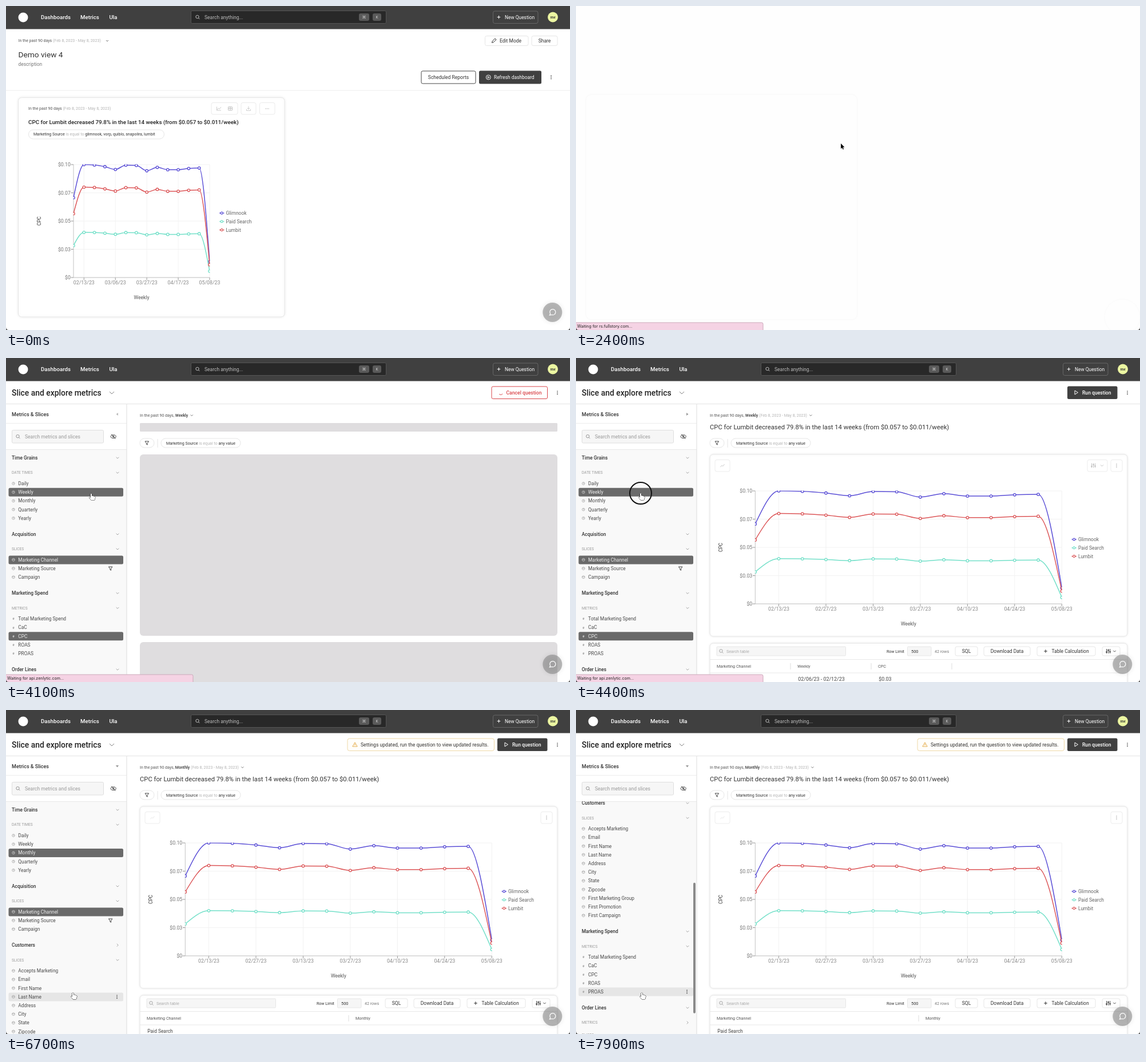
Recreate the animation shown at these times as an HTML page with a canvas. Size 986x568 px, loop 8000 ms.

```html
<!DOCTYPE html>
<html lang="en">
<head>
<meta charset="utf-8">
<title>Dashboard to explore view</title>
<style>
html, body { margin: 0; width: 100%; height: 100%; overflow: hidden; background: #fff; }
canvas { display: block; width: 986px; height: 568px; }
</style>
</head>
<body>
<canvas id="stage"></canvas>
<script>
const W = 986, H = 568, LOOP = 8000;
const canvas = document.getElementById('stage');
const g = canvas.getContext('2d');
const dpr = window.devicePixelRatio || 1;
canvas.width = W * dpr;
canvas.height = H * dpr;

const INK = '#333', TEXT = '#555', MUTED = '#b4b4b4', EDGE = '#e6e6e6', DARK = '#404040', RED = '#d9454a';
const HEADLINE = 'CPC for Lumbit decreased 79.8% in the last 14 weeks (from $0.057 to $0.011/week)';
const DATES = ' (Feb 8, 2023 - May 8, 2023)';

// Times at which the state changes, in ms
const BLANK = 1400, EXPLORE = 2600, LOADED = 4400, MONTHLY_ON = 4900, WEEKLY_OFF = 5700, CPC_OFF = 6300;

// ---------- helpers ----------
const clamp = v => Math.max(0, Math.min(1, v));
const ease = v => { v = clamp(v); return v * v * (3 - 2 * v); };

function track(keys, t) {
  let i = keys.findIndex(k => k[0] > t);
  if (i < 0) return keys[keys.length - 1].slice(1);
  if (i === 0) return keys[0].slice(1);
  const a = keys[i - 1], b = keys[i], k = ease((t - a[0]) / (b[0] - a[0]));
  return a.slice(1).map((v, n) => v + (b[n + 1] - v) * k);
}

function text(s, x, y, size, color = INK, weight = 400, align = 'left', font = 'Roboto') {
  g.font = `${weight} ${size}px ${font}, sans-serif`;
  g.textAlign = align;
  g.fillStyle = color;
  g.fillText(s, x, y + size * 0.355);
  return g.measureText(s).width;
}

function runs(x, y, size, ...parts) {
  for (const [s, color, weight] of parts) x += text(s, x, y, size, color, weight);
  return x;
}

function box(x0, y0, x1, y1, r, fill, stroke, lw = 1) {
  g.beginPath();
  g.roundRect(x0, y0, x1 - x0, y1 - y0, r);
  if (fill) { g.fillStyle = fill; g.fill(); }
  if (stroke) { g.strokeStyle = stroke; g.lineWidth = lw; g.stroke(); }
}

function line(color, lw, ...p) {
  g.beginPath();
  for (let i = 0; i < p.length; i += 2) g.lineTo(p[i], p[i + 1]);
  g.strokeStyle = color;
  g.lineWidth = lw;
  g.stroke();
}

function disc(x, y, r, fill, stroke, lw = 1) {
  g.beginPath();
  g.arc(x, y, r, 0, 7);
  if (fill) { g.fillStyle = fill; g.fill(); }
  if (stroke) { g.strokeStyle = stroke; g.lineWidth = lw; g.stroke(); }
}

function shadowed(blur, color, draw) {
  g.save();
  g.shadowColor = color;
  g.shadowBlur = blur * dpr;
  draw();
  g.restore();
}

function chevron(x, y, s = 2.5, color = '#888', right = false) {
  if (right) line(color, 0.9, x - s / 2, y - s, x + s / 2, y, x - s / 2, y + s);
  else line(color, 0.9, x - s, y - s / 2, x, y + s / 2, x + s, y - s / 2);
}

function kebab(x, y, color = INK, flat = false) {
  for (const d of [-2.6, 0, 2.6]) disc(flat ? x + d : x, flat ? y : y + d, 0.8, color);
}

function lens(x, y, color) {
  disc(x, y, 2.7, null, color, 0.9);
  line(color, 0.9, x + 2, y + 2, x + 4, y + 4);
}

function plus(x, y, color) {
  line(color, 1, x - 2.8, y, x + 2.8, y);
  line(color, 1, x, y - 2.8, x, y + 2.8);
}

function funnel(x, y) {
  line(INK, 0.9, x - 3.3, y - 3, x + 3.3, y - 3, x + 0.9, y + 0.3, x + 0.9, y + 3.2, x - 0.9, y + 2.2, x - 0.9, y + 0.3, x - 3.3, y - 3);
}

function sliders(x, y, color) {
  for (const [d, k] of [[-3, 1.5], [0, -1.5], [3, 1]]) {
    line(color, 0.9, x + d, y - 4, x + d, y + 4);
    disc(x + d, y + k, 1.2, color);
  }
}

function trend(x, y, color) {
  line(color, 0.9, x - 3.5, y + 2.5, x - 1, y - 0.5, x + 0.7, y + 1.2, x + 3.5, y - 2.5);
}

function button(label, x0, y0, x1, y1, size = 8.5) {
  box(x0, y0, x1, y1, 3, '#fff', EDGE);
  text(label, (x0 + x1) / 2, (y0 + y1) / 2, size, INK, 400, 'center');
}

// ---------- line chart ----------
const DROPS = [58, 0, 0.7, 3.7, 8.5, 1, 1.5, 10.8, 4.8, 9, 9, 6.8, 6, 170];
const SERIES = [['Glimnook', '#5a4ed6', 1], ['Paid Search', '#74e0c9', 0.4], ['Lumbit', '#dc5759', 0.8]];
const WEEKS = ['02/06', '02/13', '02/20', '02/27', '03/06', '03/13', '03/20', '03/27', '04/03', '04/10', '04/17', '04/24', '05/01', '05/08'];

function smoothLine(xs, ys) {
  const h = xs[1] - xs[0], n = xs.length;
  const s = ys.slice(1).map((y, i) => (y - ys[i]) / h);
  const m = ys.map((_, i) => {
    if (!i || i === n - 1) return 0;
    const a = s[i - 1], b = s[i];
    return (Math.sign(a) + Math.sign(b)) * Math.min(Math.abs(a), Math.abs(b), Math.abs(a + b) / 4);
  });
  m[0] = (3 * s[0] - m[1]) / 2;
  m[n - 1] = (3 * s[n - 2] - m[n - 2]) / 2;
  g.beginPath();
  g.moveTo(xs[0], ys[0]);
  for (let i = 1; i < n; i++) {
    g.bezierCurveTo(xs[i - 1] + h / 3, ys[i - 1] + m[i - 1] * h / 3, xs[i] - h / 3, ys[i] - m[i] * h / 3, xs[i], ys[i]);
  }
  g.stroke();
}

function chart(x0, x1, y0, every, titleX, legendX) {
  const h = 198, y1 = y0 + h, step = (x1 - x0) / 13;
  const xs = DROPS.map((_, i) => x0 + i * step);
  ['$0.10', '$0.07', '$0.05', '$0.03', '$0'].forEach((s, i) => {
    const y = y0 + i * h / 4;
    line('#efefef', 0.8, x0, y, x1, y);
    line('#888', 0.9, x0 - 4.5, y, x0, y);
    text(s, x0 - 5, y, 8.8, '#777', 400, 'right');
  });
  for (let i = 1; i < 14; i += every) {
    line('#efefef', 0.8, xs[i], y0, xs[i], y1);
    line('#888', 0.9, xs[i], y1, xs[i], y1 + 4.5);
    text(WEEKS[i] + '/23', xs[i], y1 + 9, 8.8, '#888', 400, 'center');
  }
  line('#bbb', 0.9, x0, y0, x0, y1, x1, y1);

  g.save();
  g.beginPath();
  g.rect(x0 - 0.5, y0 - 0.5, x1 - x0 + 1, h + 1);
  g.clip();
  for (const [, color, k] of SERIES) {
    const ys = DROPS.map(d => y1 - (h - d) * k);
    g.strokeStyle = color;
    g.lineWidth = 1.5;
    smoothLine(xs, ys);
    xs.forEach((x, i) => disc(x, ys[i], 2.2, '#fff', color, 1.3));
  }
  g.restore();

  const mid = y0 + h / 2;
  SERIES.forEach(([name, color], i) => {
    const y = mid - 14 + i * 14.8;
    line(color, 1.2, legendX, y, legendX + 8.5, y);
    disc(legendX + 4.2, y, 1.9, '#fff', color, 1.2);
    text(name, legendX + 11.5, y, 8.5, '#666');
  });
  text('Weekly', (x0 + x1) / 2, y1 + 35, 8.5, TEXT, 400, 'center');
  g.save();
  g.translate(titleX, mid);
  g.rotate(-Math.PI / 2);
  text('CPC', 0, 0, 8.3, INK, 400, 'center');
  g.restore();
}

// ---------- shared parts ----------
function topBar() {
  g.fillStyle = DARK;
  g.fillRect(0, 0, W, 40.5);
  disc(30, 20, 8.5, '#fff');
  text('Dashboards', 61, 20, 9.7, '#fff', 500);
  text('Metrics', 130, 20, 9.7, '#fff', 500);
  text('Ula', 180.5, 20, 9.7, '#fff', 500);
  box(323.5, 8.5, 664.5, 30.5, 2, '#282828', '#555');
  lens(334.5, 19, '#ccc');
  text('Search anything...', 347, 20, 8.5, '#bbb');
  box(617, 13, 635, 26, 3, '#5a5a5a');
  box(641, 13, 656, 26, 3, '#5a5a5a');
  text('⌘', 626, 19.5, 7, '#ccc', 400, 'center', 'DejaVu Sans');
  text('K', 648.5, 19.5, 6.5, '#ccc', 400, 'center');
  box(851.5, 9, 930, 30.5, 3, null, '#666');
  plus(861.5, 19.5, '#fff');
  text('New Question', 872, 20, 8.4, '#fff');
  disc(956, 19.5, 9, '#ecf6a2');
  text('RM', 956, 19.5, 6, INK, 500, 'center');
}

function chatBubble() {
  shadowed(8, 'rgba(0,0,0,.18)', () => disc(955.3, 537, 17, 'rgba(125,125,125,.52)'));
  g.beginPath();
  g.arc(955.8, 536.6, 5, 2.5, 8.2);
  g.lineTo(950.4, 542);
  g.closePath();
  g.strokeStyle = '#fff';
  g.lineWidth = 1.2;
  g.stroke();
}

function corners() {
  g.fillStyle = '#444';
  for (const [x, d] of [[0, 1], [W, -1]]) {
    g.beginPath();
    g.moveTo(x, H - 5);
    g.quadraticCurveTo(x, H, x + 5 * d, H);
    g.lineTo(x, H);
    g.fill();
  }
}

// ---------- dashboard ----------
function dashboard() {
  topBar();
  runs(21.5, 61, 7, ['In the past 90 days', TEXT], [DATES, MUTED]);
  chevron(177, 61, 2, '#666');
  text('Demo view 4', 21.5, 85.5, 13.7, INK);
  text('description', 21.5, 102, 8.4, '#777');
  box(837.5, 52.5, 913, 69.5, 3, '#fff', EDGE);
  line(INK, 1, 849.5, 64.3, 850.3, 61.6, 855, 57, 857, 59, 852.2, 63.6, 849.5, 64.3);
  text('Edit Mode', 863, 61, 8.5);
  button('Share', 919, 52.5, 964, 69.5);
  box(726, 114, 821, 136, 2.5, '#fff', '#444');
  text('Scheduled Reports', 773.5, 125, 8.5, INK, 400, 'center');
  box(827, 113.5, 936, 136.5, 2.5, DARK);
  disc(843.3, 125, 4, null, '#fff', 0.9);
  line('#fff', 0.9, 842.2, 123.2, 845.2, 125, 842.2, 126.8, 842.2, 123.2);
  text('Refresh dashboard', 853, 125, 8.4, '#fff');
  kebab(953, 125);
  line('#ececec', 1, 0, 148, W, 148);

  shadowed(5, 'rgba(0,0,0,.08)', () => box(21.5, 160.5, 487, 545, 6, '#fff', EDGE));
  runs(39, 180, 7, ['In the past 90 days', TEXT], [DATES, MUTED]);
  for (const [a, b] of [[359, 405], [411, 437], [443.5, 470]]) box(a, 169.5, b, 190, 3, '#fff', '#ebebeb');
  line('#c8c8c8', 0.9, 368.5, 176.5, 368.5, 183, 376, 183);
  trend(372.5, 179.5, '#c8c8c8');
  box(388.5, 176.8, 395.5, 182.8, 0.5, null, '#c0c0c0', 1);
  line('#c0c0c0', 1, 388.5, 179.5, 395.5, 179.5);
  line('#c0c0c0', 1, 392, 177, 392, 183);
  line('#c8c8c8', 0.9, 424, 176, 424, 181, 422, 179, 424, 181, 426, 179);
  line('#c8c8c8', 0.9, 420.5, 181, 420.5, 183.3, 427.5, 183.3, 427.5, 181);
  kebab(456.5, 180, '#bbb', true);
  text(HEADLINE, 39, 203.5, 9.8, '#222', 500);
  box(39.5, 217, 276.5, 233, 8, '#fff', EDGE);
  runs(48, 225, 7, ['Marketing Source', INK], [' is equal to', MUTED], [' glimnook, vorp, quiblo, snapolira, lumbit', INK]);
  chart(118, 356, 278, 3, 58, 373);
  chatBubble();
}

function blankPage() {
  g.fillStyle = '#fefefe';
  g.fillRect(0, 0, W, H);
  box(17, 155, 492, 550, 10, null, '#fbfbfb', 2);
  disc(955, 545, 31, null, '#fcfcfc', 2);
}

// ---------- explore view ----------
const GRAINS = ['Daily', 'Weekly', 'Monthly', 'Quarterly', 'Yearly'];
const SPEND = ['Total Marketing Spend', 'CaC', 'CPC', 'ROAS', 'PROAS'];
const CUSTOMER = ['Accepts Marketing', 'Email', 'First Name', 'Last Name', 'Address', 'City', 'State', 'Zipcode',
  'First Marketing Group', 'First Promotion', 'First Campaign'];

function sections(t) {
  const list = [
    ['Time Grains', 'DATE TIMES', GRAINS],
    ['Acquisition', 'SLICES', ['Marketing Channel', 'Marketing Source', 'Campaign']]
  ];
  if (t >= CPC_OFF) list.push(['Customers', 'SLICES', CUSTOMER]);
  const narrow = t >= MONTHLY_ON && t < CPC_OFF;
  list.push(['Marketing Spend', 'METRICS', narrow ? [SPEND[0], SPEND[2]] : SPEND]);
  if (!narrow) list.push(['Order Lines', 'METRICS', []]);
  return list;
}

function itemIcon(kind, x, y, color) {
  if (kind === 'METRICS') return text('#', x, y, 6, color, 700, 'center');
  if (kind === 'SLICES') {
    line(color, 0.7, x, y - 2.6, x + 2.2, y - 1.3, x + 2.2, y + 1.3, x, y + 2.6, x - 2.2, y + 1.3, x - 2.2, y - 1.3, x, y - 2.6);
    return line(color, 0.7, x - 2.2, y - 1.3, x, y, x + 2.2, y - 1.3);
  }
  disc(x, y, 2.3, null, color, 0.7);
  line(color, 0.7, x, y - 1.4, x, y, x + 1.2, y);
}

function sidebar(t, mouse) {
  const [scroll] = track([[7150, 0], [7500, 190], [7650, 190], [7900, 249]], t);
  const narrow = t >= MONTHLY_ON && t < CPC_OFF;
  const picked = { 'Marketing Channel': 1, Weekly: t < WEEKLY_OFF, Monthly: t >= MONTHLY_ON, CPC: t < CPC_OFF };
  g.fillStyle = '#fff';
  g.fillRect(0, 81, 211, H);
  text('Metrics & Slices', 10, 98.5, 9, INK, 500);
  g.save();
  g.translate(194.5, 98.5);
  g.rotate(t < LOADED ? Math.PI : ease((t - LOADED) / 300) * Math.PI / 2);
  g.beginPath();
  g.moveTo(-1.5, -2.6);
  g.lineTo(2, 0);
  g.lineTo(-1.5, 2.6);
  g.fillStyle = t < LOADED ? '#bbb' : '#999';
  g.fill();
  g.restore();
  line('#ececec', 1, 0, 114.5, 211, 114.5);
  box(10.5, 126.5, 170.5, 149, 2, '#f6f6f6', '#dedede');
  lens(20.5, 137.2, '#888');
  text('Search metrics and slices', 33, 138, 8.5, '#999');
  g.beginPath();
  g.ellipse(187.7, 137.7, 4.5, 2.9, 0, 0, 7);
  g.strokeStyle = INK;
  g.lineWidth = 0.9;
  g.stroke();
  disc(187.7, 137.7, 1.3, null, INK, 0.9);
  line(INK, 0.9, 184, 133.8, 191.6, 141.6);

  g.save();
  g.beginPath();
  g.rect(0, 160, 212, 408);
  g.clip();
  g.fillStyle = '#f9f9f9';
  g.fillRect(0, 160, 211, narrow ? 337 : 408);
  line('#e8e8e8', 1, 0, 160.5, 211, 160.5);
  if (narrow) line('#e0e0e0', 1, 0, 497, 211, 497);
  let y = 175 - scroll;
  for (const [title, kind, items] of sections(t)) {
    text(title, 10, y, 8.4, INK, 500);
    chevron(195, y, 2.4, '#999', title === 'Customers' && t < 7000);
    y += 26;
    text(kind, 10, y, 6.6, '#999');
    chevron(195, y, 2.4, '#999', !items.length);
    y += 19;
    for (const name of items) {
      const on = picked[name];
      const hover = t > 4500 && mouse.hand && Math.abs(mouse.y + 3 - y) < 7.6;
      if (on || hover) box(4.5, y - 7.4, 205, y + 7.6, 2.5, on ? '#6a6a6a' : '#e6e6e6');
      itemIcon(kind, 13, y, on ? '#ddd' : '#999');
      text(name, 21.3, y, 8.4, on ? '#eee' : '#4a4a4a');
      if (name === 'Marketing Source') funnel(182.7, y);
      if (hover) kebab(194, y, on ? '#fff' : INK);
      y += 15.2;
    }
    y += 12.8;
    if (!items.length) text('SLICES', 10, y - 10, 6.6, '#999');
  }
  if (scroll > 0) {
    const top = 162 + scroll * 0.565;
    box(205, top, 209, top + 229, 2, '#8a8a8a');
  }
  g.restore();
  line('#dcdcdc', 1, 211, 81, 211, H);
}

function table(t) {
  shadowed(4, 'rgba(0,0,0,.07)', () => box(234, 500, 964, 590, 6, '#fff', EDGE));
  box(246, 506, 471.5, 522, 1.5, '#f6f6f6', EDGE);
  lens(253.5, 513.5, '#999');
  text('Search table', 263, 514.2, 7.2, '#aaa');
  text('Row Limit', 543, 514.2, 7);
  box(579.5, 506, 621, 522, 1.5, '#f6f6f6', EDGE);
  text('500', 586, 514.2, 7.4);
  text('42 rows', 627, 514.2, 7.1, '#777');
  button('SQL', 663, 506, 702, 522);
  button('Download Data', 713, 506, 794, 522);
  box(806, 506, 908, 522, 3, '#fff', EDGE);
  plus(821, 514, INK);
  text('Table Calculation', 831.5, 514, 8.5);
  box(920, 506, 951, 522, 3, '#fff', EDGE);
  sliders(930.5, 514, INK);
  chevron(941.5, 514, 2.2, INK);
  line('#e8e8e8', 1, 234, 528.5, 964, 528.5);
  line('#e8e8e8', 1, 234, 552, 964, 552);

  const cols = [['Marketing Channel', 'Paid Search']];
  if (t < WEEKLY_OFF) cols.push(['Weekly', '02/06/23 - 02/12/23']);
  if (t >= MONTHLY_ON) cols.push(['Monthly', '']);
  if (t < CPC_OFF) cols.push(['CPC', '$0.03']);
  const w = t < MONTHLY_ON ? 141 : 730 / cols.length;
  cols.forEach(([name, cell], i) => {
    const x = 246 + i * w;
    text(name, x, 540.5, 7.2, TEXT);
    text(cell, x + 1.3, 562.7, i ? 8.9 : 8.4, '#444');
    if (x + w < 960) line('#ddd', 1, x + w - 12, 535, x + w - 12, 546);
  });
}

function results(t) {
  text(HEADLINE, 234, 121, 11.25, INK);
  shadowed(4, 'rgba(0,0,0,.07)', () => box(234, 169, 964, 488, 6, '#fff', EDGE));
  const fresh = t < MONTHLY_ON;
  box(243, 178.5, 269, 199, 3, '#fff', '#ececec');
  trend(256, 188.7, fresh ? '#c4c4c4' : '#e6e6e6');
  if (fresh) {
    box(894, 178.5, 929, 199, 3, '#fff', '#ececec');
    sliders(904.5, 188.5, '#bbb');
    chevron(919.5, 188.5, 2.4, '#bbb');
  }
  box(935, 178.5, 955, 199, 3, '#fff', '#ececec');
  kebab(945, 188.7, '#aaa');
  chart(313.3, 849.3, 233, 2, 253, 866.5);
  table(t);
}

function skeleton() {
  const c = '#dfdddf';
  box(234, 114, 964, 129, 1.5, c);
  box(234, 169, 964, 487, 6, c);
  box(234, 498, 964, 590, 6, c);
}

function actions(t) {
  if (t < LOADED) {
    box(849, 50, 946.5, 71.5, 2.5, '#fff', RED);
    const a = t / 1000 * Math.PI * 2;
    g.beginPath();
    g.arc(865, 60.5, 3.9, a, a + 1.8);
    g.strokeStyle = RED;
    g.lineWidth = 1;
    g.stroke();
    text('Cancel question', 874.5, 60.5, 8.6, RED, 500);
  } else {
    box(859, 49.5, 946.5, 72, 2.5, DARK);
    line('#fff', 1, 872, 57, 877.5, 60.5, 872, 64, 872, 57);
    text('Run question', 885, 60.5, 8.6, '#fff', 500);
  }
  kebab(964, 60.8);
  if (t < MONTHLY_ON) return;
  box(597, 50, 853.5, 71.5, 3.5, '#fffefb', '#efd9a8');
  line('#e2a53c', 0.9, 610, 56.8, 614.2, 64, 605.8, 64, 610, 56.8);
  line('#e2a53c', 0.9, 610, 59.3, 610, 62);
  text('Settings updated, run the question to view updated results.', 620, 60.5, 8.6, INK);
}

function explore(t, mouse) {
  const loaded = t >= LOADED;
  topBar();
  text('Slice and explore metrics', 10, 61, 13.9, '#222', 500);
  chevron(185, 61, 4, '#777');
  line('#e4e4e4', 1, 0, 80.5, W, 80.5);
  actions(t);
  const grain = t < WEEKLY_OFF ? 'Weekly' : 'Monthly';
  const end = runs(234, 100.5, 7, ['In the past 90 days, ', TEXT], [grain, INK, 500], [loaded ? DATES : '', MUTED]);
  chevron(end + 6.5, 100.5, 2, '#666');
  box(234, 141, 259, 157, 8, '#fff', EDGE);
  funnel(246.3, 149);
  line('#e4e4e4', 1, 265, 142, 265, 157);
  box(271, 141, 410, 157, 8, '#fff', EDGE);
  runs(280, 149.2, 7.1, ['Marketing Source', INK], [' is equal to', MUTED], [' any value', INK]);
  if (loaded) results(t); else skeleton();
  sidebar(t, mouse);
  if (t >= 5000 && t < WEEKLY_OFF) {
    shadowed(7, 'rgba(0,0,0,.2)', () => box(217, 220, 511, 281.5, 5, '#fff'));
    ['The month associated with the metric or metrics you have in',
      'your query. When in doubt, use this to trend metrics over',
      'time.'].forEach((s, i) => text(s, 228, 236 + i * 14.9, 9.85, '#444'));
  }
  chatBubble();
}

// ---------- overlays ----------
function statusBar(t) {
  let alpha = 0;
  if (t >= 2400 && t < 3100) alpha = t < 2900 ? 1 : clamp((3030 - t) / 130);
  else if (t >= 3600 && t < 4800) alpha = clamp((4750 - t) / 150);
  if (!alpha) return;
  g.globalAlpha = alpha;
  box(-3, 555, 327, 572, 2.5, '#f5d3e4', '#cba9ba');
  text(`Waiting for ${t < EXPLORE ? 'rs.fullstory.com' : 'api.zenlytic.com'}...`, 2, 561.7, 7.1, '#222', 400, 'left', 'Inter');
  g.globalAlpha = 1;
}

const PATH = [
  [100, 640, 300], [800, 456, 179], [950, 456, 179], [1250, 463, 241], [3500, 463, 241], [4250, 113, 237],
  [4500, 113, 237], [4800, 95, 248], [5100, 95, 248], [5400, 83, 230.5], [5800, 83, 230.5], [6150, 80, 469],
  [6350, 80, 469], [6650, 117, 495], [7000, 117, 495], [7200, 115, 495]
];
const CLICKS = [850, 1250, 4300, MONTHLY_ON - 80, WEEKLY_OFF - 80, CPC_OFF - 80];
const ARROW = new Path2D('M0 0V9.2L2.1 7.2 3.6 10.6 5.1 9.9 3.6 6.7 6.4 6.5Z');
const HAND = new Path2D('M-1 1Q0-.8 1 1V4.5Q3 3.6 3.4 5 5 4.4 5.4 5.7 7 5.4 7 7L6.4 10 5.6 12H0Q-1.5 10-3.6 7.4-3.6 5.8-1 7.6Z');

function cursor(t, mouse) {
  if (t < 100) return;
  for (const c of CLICKS) {
    const age = t - c;
    if (age < 0 || age > 260) continue;
    g.globalAlpha = clamp((260 - age) / 100);
    const [x, y] = track(PATH, c);
    disc(x, y, 12 + 7 * clamp(age / 80), null, '#111', 2);
    g.globalAlpha = 1;
  }
  g.save();
  g.translate(mouse.x, mouse.y);
  g.lineJoin = 'round';
  g.lineWidth = mouse.hand ? 1 : 1.4;
  g.strokeStyle = mouse.hand ? '#111' : '#fff';
  g.fillStyle = mouse.hand ? '#fff' : '#000';
  const shape = mouse.hand ? HAND : ARROW;
  g.stroke(shape);
  g.fill(shape);
  g.restore();
}

function draw(t) {
  const [x, y] = track(PATH, t);
  const mouse = { x, y, hand: t >= EXPLORE && x < 205 };
  g.setTransform(dpr, 0, 0, dpr, 0, 0);
  g.fillStyle = '#fff';
  g.fillRect(0, 0, W, H);
  if (t < BLANK) dashboard();
  else if (t < EXPLORE) blankPage();
  else explore(t, mouse);
  statusBar(t);
  corners();
  cursor(t, mouse);
}

function tick() {
  draw(performance.now() % LOOP);
  requestAnimationFrame(tick);
}
tick();
</script>
</body>
</html>
```
